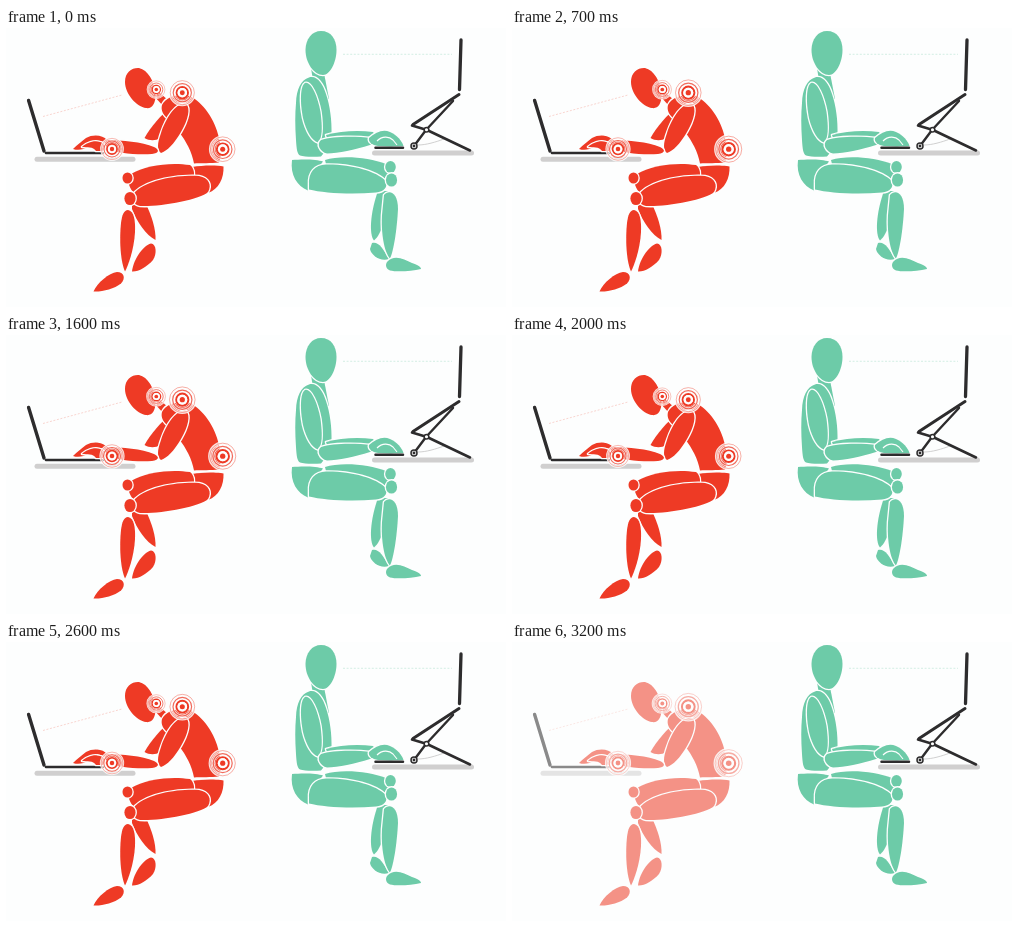
An HTML page for the animation above (3300 ms loop, 500 by 279 pixels).

```html
<!DOCTYPE html>
<html lang="en">
<head>
<meta charset="utf-8">
<title>Desk posture</title>
<style>
html, body { margin: 0; width: 100%; height: 100%; overflow: hidden; background: #fdfefe; }
svg { display: block; width: 100vw; height: 100vh; }
.body { stroke: #fdfefe; stroke-width: 2.6; stroke-linejoin: round; paint-order: stroke; }
.bar { fill: none; stroke: #2d2c2d; stroke-linecap: round; stroke-linejoin: round; }
.desk { fill: #d0cfcf; }
.sight { stroke-width: .7; stroke-dasharray: 2 1.6; }
</style>
</head>
<body>
<svg viewBox="0 0 500 279" preserveAspectRatio="none">
  <g id="slouch">
    <rect class="desk" x="28.5" y="128.8" width="101" height="5" rx="2.5"/>
    <path class="sight" d="M37 88.500L116 67" stroke="#f6c3bc"/>
    <g class="bar"><path d="M22.600 72.500L38 123" stroke-width="3.400"/><path d="M40 125H97" stroke-width="2.600"/></g>
    <g class="body" fill="#ee3a25">
      <path d="M148 68L153 64L164 74L158 79Z"/>
      <path d="M165 80C156 85 144 100 138.500 110C143 113 150 113 154 110C161 100 168 90 165 80Z"/>
      <path d="M156 77C160 68 174 65 184 68C197 75 209 91 213 110C215 120 215.500 129 213 134.500C205 135.500 195 135 188 135.500C186 124 180 113 173 104L160 89C156 85 155 81 156 77Z"/>
      <path d="M119 54C119 44 126 39.500 133 40C142 42 148 53 149.500 65C150 76 146 81 140 80C131 79 119 66 119 54Z"/>
      <path d="M180 76C185 80 182 92 175 104C168 116 161 123 155 125C151 122 151 116 155 105C160 90 170 74 180 76Z"/>
      <path d="M67 121C71 117 76 113 80 110C87 106 97 107 101 112C116 112 136 114 148 119C154 122 153 125 146 126C130 127 110 125 98 121C93 117 87 117 82 119C78 121 73 123 67 121Z"/>
      <path d="M76 119C80 115 88 112 94 114C99 115 100 120 97 123L90 123C87 118 81 120 76 119Z"/>
      <path d="M126 172L139 174C146 188 150 202 149.500 212C140 207 131 194 126 181Z"/>
      <path d="M186 139C197 137 211 137 217.500 138.500C218 150 213 161 202 165C195 163 188 155 186 139Z"/>
      <path d="M125 146C139 137 165 134 184 137C188 140 189 146 187 150L150 160L127 164C122 158 121 151 125 146Z"/>
      <path d="M129 164C143 151 172 147 193 148C203 150 206 157 202 164C194 172 153 179 134 178C127 177 124 170 129 164Z"/>
      <ellipse cx="121.500" cy="150" rx="5" ry="5.600"/>
      <ellipse cx="124" cy="170.500" rx="5.600" ry="6.600"/>
      <path d="M122 182C128 183 129.500 192 129 204C128 222 122 238 119 243.500C115 235 113 215 115 195C116 187 118 182 122 182Z"/>
      <path d="M126 243.500C127 233 136 218 145 215.500C150.500 216 151 226 147 232C141 239 132 244 126 243.500Z"/>
      <path d="M87.500 263.500C91 255 103 245 111 244C118 244 120 250 115 255.500C108 261 96 264 87.500 263.500Z"/>
    </g>
    <g id="aches"></g>
  </g>

  <g id="upright">
    <rect class="desk" x="366" y="122.600" width="102" height="5" rx="2.500"/>
    <path class="sight" d="M337 26.300H446" stroke="#c2e8da"/>
    <g class="body" fill="#6dcba8">
      <path d="M305 40L318 45L323 71L310 71Z"/>
      <path d="M303 49.500C311 47 317 56 320 66C324 78 326 92 325.500 107C323 117 319 124 315 128.500C308 129 298 129 294 127.500C291 126 290.500 120 290 112C289 98 289 86 290 75C290.500 61 295 52 303 49.500Z"/>
      <path d="M320 107C334 103 352 102 367 104L371 110C355 113 338 114 322 113Z"/>
      <path d="M315 3C325 3 330.500 11 330.500 22C330.500 34 324 47 317 47C308 47 299.500 35 299.500 22C299.500 11 306 3 315 3Z"/>
      <path d="M299 55C305 53 311.500 68 314.500 84C316.500 99 316.500 110 312 114.500C306 113 300 103 297 90C294 75 294 58 299 55Z"/>
      <path d="M315 112C326 108 350 108 365 110C368 113 367 116 364 117C349 122 332 125 321 125.500C314 124 310 116 315 112Z"/>
      <path d="M363 110C370 104 377 101 384 104C391 107 396 113 397.500 118C390 118.500 380 118.500 372 118C366 117 362 114 363 110Z"/>
      <path d="M372 163L382 163C382 185 376 206 368 212.500C363 207 364 185 372 163Z"/>
      <path d="M366 215C372 213 377 220 383 231C374 234 365 227 364 221Z"/>
      <path d="M286 132C295 131 311 131 317 133.500C311 142 304 150 302 162.500C291 158 284 147 286 132Z"/>
      <path d="M319 132C334 127 363 129 380 136C384 141 383 147 380 151L340 145L321 140Z"/>
      <path d="M303 157C302 144 309 137 320 136.500C345 136 370 143 380 153C382 159 378 164 370 164.500C345 167 317 165 303 161.500Z"/>
      <ellipse cx="384.500" cy="139" rx="5.300" ry="6"/>
      <ellipse cx="385.500" cy="152" rx="5.600" ry="6.600"/>
      <path d="M378 167C383 161 392 164 392 181C391 200 388 222 384 230.500C378 224 375 205 376 187Z"/>
      <path d="M381 234C388 226 398 231 406 235C412 237 415 239 415 241C405 243.500 390 244 384 242.500C380 241 379 237 381 234Z"/>
    </g>
    <path d="M371 113C376 108 383 108 387 112L391 117" fill="none" stroke="#fdfefe" stroke-width="1.100"/>
    <path d="M412 117C420 117 430 114 438 111" fill="none" stroke="#c4c4c4" stroke-width=".8"/>
    <g class="bar">
      <path d="M455 12L453.500 61.500" stroke-width="3.300"/>
      <path d="M369.500 119.800H397" stroke-width="2.500"/>
      <path d="M453 66.500L407 96.500" stroke-width="3"/>
      <path d="M447 73L420 102L408 118" stroke-width="2.400"/>
      <path d="M406 97.500L421 102L464 122.500" stroke-width="2.600"/>
    </g>
    <g fill="#fdfefe" stroke="#2d2c2d" stroke-width="1.500">
      <circle cx="420.500" cy="101.800" r="2.300"/>
      <circle cx="408" cy="118" r="3"/>
      <circle cx="408" cy="118" r=".7"/>
    </g>
  </g>
</svg>
<script>
const LOOP = 3300, STEP = 100;
const NS = "http://www.w3.org/2000/svg";
const RED = "#ee3a25", PAPER = "#fdfefe";
const slouch = document.getElementById("slouch");
const aches = document.getElementById("aches");

function add(parent, tag, attrs) {
  const el = document.createElementNS(NS, tag);
  for (const k in attrs) el.setAttribute(k, attrs[k]);
  return parent.appendChild(el);
}

// x, y, outer radius
const spots = [[150.3, 61.5, 10.2], [176.3, 64.7, 14.3], [106, 121, 12.6], [216.7, 121.2, 14.6]]
  .map(([x, y, r]) => {
    const g = add(aches, "g", {});
    const ring = (k, width, stroke, opacity) => add(g, "circle", {
      r: r * k, fill: "none", stroke, "stroke-width": r * width, opacity
    });
    // distance, red weight, red strength
    [[0.93, 0.06, 0.5], [0.7, 0.09, 0.75], [0.44, 0.15, 1]].forEach(([k, width, alpha]) => {
      ring(k, 0.22, PAPER, 0.85);
      ring(k, width, RED, alpha);
    });
    add(g, "circle", { r: r * 0.36, fill: PAPER });
    add(g, "circle", { r: r * 0.19, fill: RED });
    return { g, x, y };
  });

// time, opacity
const fade = [[0, 1], [2800, 1], [2900, 0.55], [3000, 0], [3100, 0], [3200, 0.55], [3300, 1]];

function lerpTable(table, t) {
  const i = table.findIndex(row => row[0] > t);
  const [t0, a] = table[i - 1], [t1, b] = table[i];
  return a + (b - a) * (t - t0) / (t1 - t0);
}

function draw(ms) {
  const t = Math.floor((ms % LOOP) / STEP) * STEP;
  const phase = (t + 300) % 900;
  const scale = 1 - 0.1 * Math.sin(Math.PI * phase / 800);
  for (const { g, x, y } of spots) g.setAttribute("transform", `translate(${x} ${y}) scale(${scale})`);
  slouch.setAttribute("opacity", lerpTable(fade, t));
}

const start = performance.now();
function tick() {
  draw(performance.now() - start);
  requestAnimationFrame(tick);
}
tick();
</script>
</body>
</html>
```
